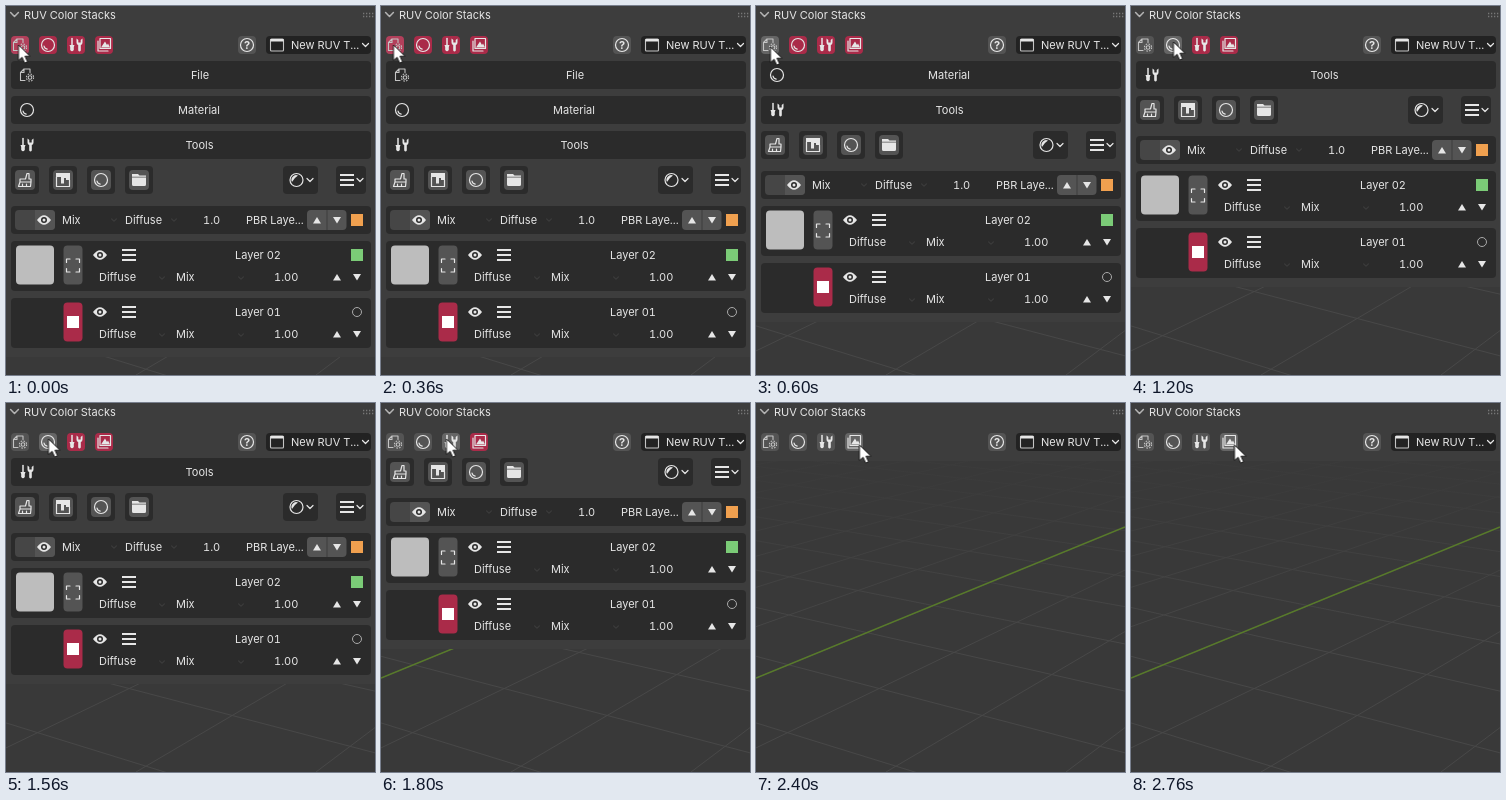
Recreate the animation shown at these times as an HTML page. Size 369 px wide and 369 px high, loop 3 s.

```html
<!DOCTYPE html>
<html lang="en">
<head>
<meta charset="utf-8">
<title>Layer panel</title>
<style>
html, body { margin: 0; width: 100%; height: 100%; overflow: hidden; background: #393939; }
svg { display: block; width: 369px; height: 369px; }
text { font: 11px Inter, sans-serif; fill: #e6e6e6; font-variant-numeric: tabular-nums; white-space: pre; }
.mid { text-anchor: middle; }
.bg { fill: #3d3d3d; }
.box { fill: #2b2b2b; }
.btn { fill: #545454; }
.red { fill: #aa2b49; }
.ink { fill: #e6e6e6; }
.line { fill: none; stroke: #e6e6e6; stroke-width: 1.2; stroke-linecap: round; stroke-linejoin: round; }
.soft { stroke: #c4c4c4; stroke-width: 1.1; }
.dim { stroke: #3a3a3a; }
.grid { stroke: #484848; stroke-width: 1; }

.panel, .cursor, .hover, .tab { animation: 3s step-end infinite; }
.panel { animation-name: collapse; }
.cursor { animation-name: point; }
.hover { animation-name: hover; }
.t1 { animation-name: off1; }
.t2 { animation-name: off2; }
.t3 { animation-name: off3; }
.t4 { animation-name: off4; }

@keyframes collapse {
  0% { transform: translateY(0); }
  20% { transform: translateY(-35px); }
  40% { transform: translateY(-70px); }
  60% { transform: translateY(-105px); }
  80%, 100% { transform: translateY(-293px); }
}
@keyframes point {
  0% { transform: translate(12.5px, 39px); }
  20% { transform: translate(14.5px, 41px); }
  40% { transform: translate(42.5px, 36px); }
  60% { transform: translate(65.5px, 36px); }
  80%, 100% { transform: translate(103.5px, 42px); }
}
@keyframes hover {
  0% { transform: translateX(0); }
  40% { transform: translateX(28px); }
  60% { transform: translateX(56px); }
  80%, 100% { transform: translateX(84px); }
}
@keyframes off1 { 0% { fill: #aa2b49; } 20%, 100% { fill: #545454; } }
@keyframes off2 { 0% { fill: #aa2b49; } 40%, 100% { fill: #545454; } }
@keyframes off3 { 0% { fill: #aa2b49; } 60%, 100% { fill: #545454; } }
@keyframes off4 { 0% { fill: #aa2b49; } 80%, 100% { fill: #545454; } }
</style>
</head>
<body>
<svg viewBox="0 0 369 369">
  <defs>
    <linearGradient id="haze" x2="0" y2="1">
      <stop offset=".1" stop-color="#393939" stop-opacity=".85"/>
      <stop offset=".6" stop-color="#393939" stop-opacity="0"/>
    </linearGradient>

    <path id="chev" class="line" d="M-3-1.5 0 1.5 3-1.5"/>
    <path id="chev-dim" class="line dim" d="M-2.5-1.2 0 1.2 2.5-1.2"/>
    <path id="up" class="ink" d="M0-3 4 3.5H-4z"/>
    <path id="down" class="ink" d="M0 3.5 4-3H-4z"/>
    <path id="menu" class="line" style="stroke-width:2;stroke-linecap:butt" d="M-7-5H7M-7 0H7M-7 5H7"/>
    <g id="eye">
      <path class="ink" d="M-7 0Q0-9.500 7 0Q0 9.500-7 0z"/>
      <circle class="box" r="3"/>
      <circle class="ink" r="1.500"/>
    </g>
    <g id="file">
      <path class="line soft" d="M-2 5.500H-6.500V-2.500L-3-6H3V-2.500M-6.500-2.500H-3V-6"/>
      <circle class="line soft" cx="3" cy="2.500" r="1.800"/>
      <circle class="line soft" cx="3" cy="2.500" r="3.600" stroke-dasharray="1.600 1.227" style="stroke-linecap:butt"/>
    </g>
    <g id="ball">
      <circle class="line" r="6.500"/>
      <path class="line" d="M-4 1Q-3.500 3.700-.8 4.200"/>
    </g>
    <g id="tools">
      <path class="line" d="M-4-6.500V0" style="stroke-width:1.500"/>
      <path class="ink" d="M-6.500 0H-1.500L-2.200 2V5Q-4 7.500-5.800 5V2z"/>
      <path class="ink" d="M.5-6.500V-2.500Q.5-.5 2.200 0V5.500Q3.500 7.500 4.800 5.500V0Q6.500-.5 6.500-2.500V-6.500L4.700-5V-2.500H2.300V-5z"/>
    </g>
    <g id="image">
      <path class="line" d="M-6-4V6H4"/>
      <rect class="line" x="-4" y="-6.500" width="10.500" height="10"/>
      <path class="ink" d="M-3 2.500 1-3.500 3 0 4-1.500 6 2.500z"/>
    </g>
    <path id="brush" class="line" d="M.5-1 2-6.500H4V-1H6V2H-5V-1zM-5 2-6.500 6.500H5.500L6 2M-2.500 6V4M1.500 6V4"/>
    <g id="fill">
      <path class="line" d="M-6.500-3V6.500H6.500V0"/>
      <path class="ink" d="M-7-7H7V0H3V-2H1V3.500H-2V-3H-7z"/>
    </g>
    <path id="folder" class="ink" d="M-7-6H-1L.5-4.500H7V-3.300H-7zM-7-2.500H7V4.500Q7 6 5.500 6H-5.500Q-7 6-7 4.500z"/>
    <g id="tool">
      <rect class="box" x="-14" y="-14" width="28" height="28" rx="4"/>
      <rect class="btn" x="-10" y="-10" width="20" height="20" rx="4"/>
    </g>
    <rect id="tab" x="-9" y="-9" width="18" height="18" rx="4"/>
    <rect id="row" class="box" x="5" y="-14" width="360" height="28" rx="4"/>

    <g id="layer">
      <rect class="box" x="5" y="-1" width="360" height="50" rx="4"/>
      <use href="#eye" x="94" y="13"/>
      <use href="#menu" x="123" y="13"/>
      <text x="93" y="39">Diffuse</text>
      <use href="#chev-dim" x="156" y="36"/>
      <text x="170" y="39">Mix</text>
      <use href="#chev-dim" x="235" y="36"/>
      <text x="268" y="39">1.00</text>
      <use href="#up" x="331" y="35"/>
      <use href="#down" x="351" y="35"/>
    </g>
  </defs>

  <rect width="369" height="369" fill="#393939"/>
  <g id="floor"></g>
  <rect y="50" width="369" height="319" fill="url(#haze)"/>
  <path d="M0 275 369 124" stroke="#587b2a" stroke-width="1.500"/>

  <g class="panel">
    <rect class="bg" width="369" height="351"/>

    <use href="#row" y="69"/>
    <use href="#file" x="21" y="69"/>
    <text class="mid" x="194" y="73">File</text>
    <use href="#row" y="104"/>
    <use href="#ball" x="21" y="104"/>
    <text class="mid" x="193" y="108">Material</text>
    <use href="#row" y="139"/>
    <use href="#tools" x="21" y="139"/>
    <text class="mid" x="193.500" y="143">Tools</text>

    <g transform="translate(0 174)">
      <use href="#tool" x="19"/><use href="#brush" x="19"/>
      <use href="#tool" x="57"/><use href="#fill" x="57"/>
      <use href="#tool" x="95"/><use href="#ball" x="95"/>
      <use href="#tool" x="133"/><use href="#folder" x="133"/>
      <rect class="box" x="277" y="-14" width="35" height="28" rx="4"/>
      <circle class="line" cx="290.500" r="6.500"/>
      <path class="ink" d="M286 2A4.700 4.700 0 0 1 292-4.500Q288-2 286 2z"/>
      <use href="#chev" x="304"/>
      <rect class="box" x="330" y="-14" width="30" height="28" rx="4"/>
      <use href="#menu" x="341"/>
      <use href="#chev" x="354"/>
    </g>

    <g transform="translate(0 214)">
      <use href="#row"/>
      <rect x="9" y="-10" width="40" height="20" rx="4" fill="#464646"/>
      <path class="btn" d="M29-10H45Q49-10 49-6V6Q49 10 45 10H29z"/>
      <use href="#eye" x="38"/>
      <text x="56" y="4">Mix</text>
      <use href="#chev-dim" x="108"/>
      <text x="119" y="4">Diffuse</text>
      <use href="#chev-dim" x="168"/>
      <text x="197" y="4">1.0</text>
      <text x="240" y="4">PBR Laye...</text>
      <rect class="btn" x="301" y="-10" width="39.500" height="20" rx="4"/>
      <path d="M321-10V10" stroke="#3d3d3d"/>
      <use href="#up" x="311"/>
      <use href="#down" x="331"/>
      <rect x="345" y="-6" width="12" height="12" fill="#f0a04f"/>
    </g>

    <g transform="translate(0 236)">
      <use href="#layer"/>
      <rect x="10" y="3.500" width="38" height="39" rx="4" fill="#bdbdbd"/>
      <rect class="btn" x="57.500" y="3.500" width="19" height="39" rx="4"/>
      <path class="line" d="M60.500 20.500V17H64M70 17H73.500V20.500M73.500 26.500V30H70M64 30H60.500V26.500"/>
      <text x="229" y="17">Layer 02</text>
      <rect x="345" y="7" width="12" height="12" fill="#7bcb77"/>
    </g>
    <g transform="translate(0 293)">
      <use href="#layer"/>
      <rect class="red" x="57.500" y="3.500" width="19" height="39" rx="4"/>
      <rect x="61" y="17" width="12" height="12" fill="#fff"/>
      <text x="229" y="17">Layer 01</text>
      <circle cx="351" cy="13" r="4.500" fill="none" stroke="#aaa"/>
    </g>
  </g>

  <rect class="bg" width="369" height="54"/>
  <use href="#chev" transform="translate(8.500 8.500) scale(1.300)" opacity=".7"/>
  <text x="18" y="13">RUV Color Stacks</text>
  <path d="M357 7.500H368M357 10.500H368" stroke="#777" stroke-width="1.300" stroke-dasharray="1.300 1.700"/>

  <g transform="translate(0 39)">
    <use class="tab t1" href="#tab" x="14"/>
    <use class="tab t2" href="#tab" x="42"/>
    <use class="tab t3" href="#tab" x="70"/>
    <use class="tab t4" href="#tab" x="98"/>
    <g class="hover"><use href="#tab" x="14" fill="#fff" opacity=".1"/></g>
    <use href="#file" x="14"/>
    <use href="#ball" x="42"/>
    <use href="#tools" x="70"/>
    <use href="#image" x="98"/>
    <use class="btn" href="#tab" x="241"/>
    <circle class="line" cx="241" r="6.500"/>
    <text class="mid" x="241" y="4" style="font-weight:700">?</text>
    <rect x="260" y="-9" width="105" height="18" rx="4" fill="#222"/>
    <rect class="line soft" x="264.500" y="-6" width="13" height="12" rx="1"/>
    <path class="ink" d="M264.500-6H277.500V-3.500H264.500z"/>
    <text x="285" y="4">New RUV T...</text>
    <use href="#chev" x="359.500"/>
  </g>

  <path class="cursor" d="M0 0V15.500L3.600 12.200 6.200 18 9 16.800 6.500 11.200H11.500z" fill="#fff" stroke="#111" stroke-width=".9"/>
</svg>
<script>
// Perspective floor: two bundles of lines, each meeting at a point on the horizon.
const horizon = -113, base = 369, depth = base - horizon;
const floor = document.getElementById("floor");

function addLine(x1, y1, x2, y2) {
  const line = document.createElementNS("http://www.w3.org/2000/svg", "path");
  line.setAttribute("class", "grid");
  line.setAttribute("d", `M${x1} ${y1}L${x2} ${y2}`);
  floor.append(line);
}

for (let i = -12; i <= 3; i++) addLine(-230 + i * 180, base, 950, horizon);
for (let i = 0; i < 12; i++) {
  const y = 1 / (0.00231 + i * 0.00042) + horizon;
  const slope = (y - horizon) / 1400;
  addLine(0, y, depth, y + slope * depth);
}
</script>
</body>
</html>
```
